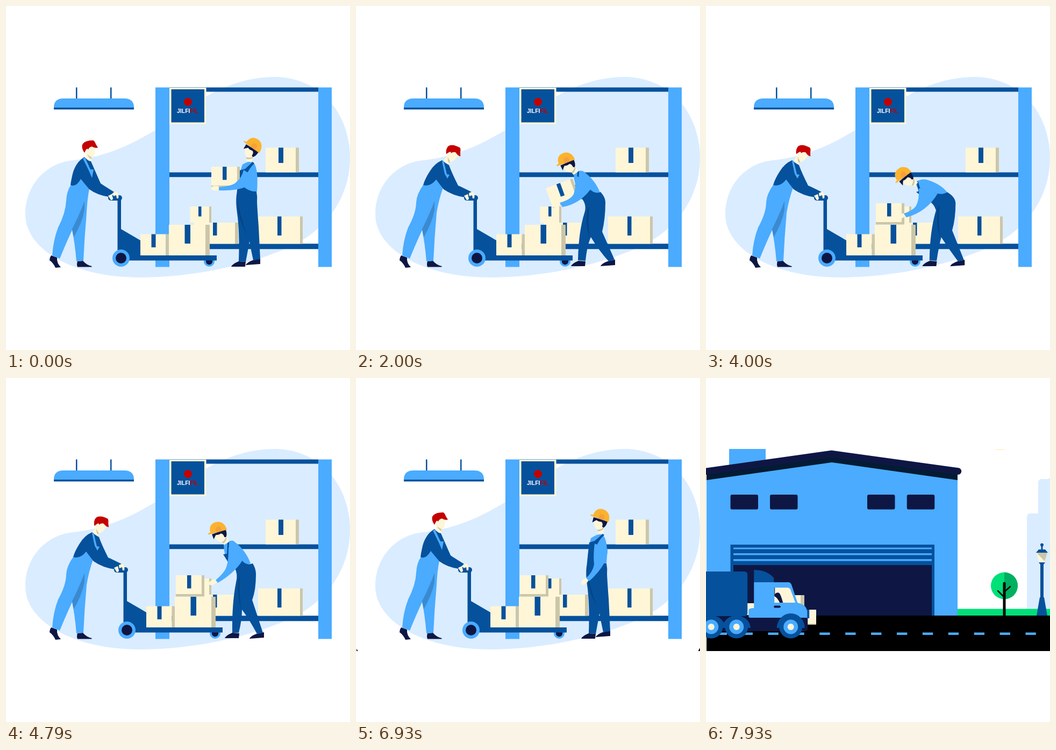
These frames come from a looping animation (640 px wide and 640 px high, 8000 ms). An HTML page:

```html
<!DOCTYPE html>
<html lang="en">
<head>
<meta charset="utf-8">
<title>Warehouse</title>
<style>
  html, body { margin: 0; width: 100%; height: 100%; overflow: hidden; background: #fff; }
  svg { display: block; width: 100vw; height: 100vh; }
  .light { fill: #4aabff; }
  .dark { fill: #06519c; }
  .navy { fill: #0e1744; }
  .cream { fill: #fff6d8; }
  .shade { fill: #ccc6a9; }
  .pale { fill: #daecff; }
  .red { fill: #c40000; }
  .fold { fill: #04437f; }
  .green { fill: #00e078; }
  text { font: bold 10.5px "Liberation Sans", Arial, sans-serif; }
</style>
</head>
<body>
<svg viewBox="0 0 640 640">
  <defs>
    <clipPath id="stage"><rect y="131.9" width="640" height="376.2"/></clipPath>
    <clipPath id="iris"><circle id="irisCircle" cx="320" cy="320" r="500"/></clipPath>
  </defs>

  <g id="street" clip-path="url(#stage)">
    <circle cx="547" cy="99.5" r="35" class="cream"/>
    <path class="pale" d="M597 442V259q0-7 7-7h14V195q0-7 7-7h12l3-3V442z"/>
    <path class="green" d="M468 429.500H640V443H468z"/>
    <path class="light" d="M43 130H111V180H43zM1 175L234 146 468 175V442H1z"/>
    <path fill="#031b33" d="M1 172L234 142 468 172V190L234 157 1 190z"/>
    <path d="M-5 174.500L233.500 141 469 173.500" fill="none" stroke="#0e1744" stroke-width="12.500" stroke-linecap="round" stroke-linejoin="round"/>
    <g class="navy" id="windows"></g>
    <path class="dark" d="M45.500 310H425V442H45.500z"/>
    <path class="light" d="M51 315.500H420v3H51zM51 326H420v3.500H51zM51 337H420v3.500H51z"/>
    <path class="navy" d="M51 348H420v94H51z"/>
    <path d="M1 442H640V508H1z"/>
    <path d="M19.700 475.800H640" stroke="#4aabff" stroke-width="4.500" stroke-dasharray="19.300 28.600"/>
    <path class="cream" d="M74 419H110V441H74zM128 404H176V431H128zM130 431H205V457H130z"/>
    <path class="shade" d="M176 404h7v27h-7zM130 457h75v2h-75z"/>
    <circle cx="555" cy="386.500" r="25" class="green"/>
    <path fill="#00b060" d="M555 361.500a25 25 0 0 1 0 50z"/>
    <path d="M555 382V442" stroke="#000" stroke-width="5" stroke-linecap="round"/>
    <path d="M543 396L555 408M566 388L555 398" stroke="#000" stroke-width="2.500" stroke-linecap="round"/>
    <path class="dark" d="M623.500 311h3v8h4.500l5 6H614l5-6h4.500zM619 343h12l-3 4v61h1l6 34H615l6-34h1V347z"/>
    <circle cx="625" cy="310.500" r="3" class="dark"/>
    <path class="cream" d="M615 325H635L630 343H620z"/>
    <path class="shade" d="M615 325H635L630 341z"/>
    <g id="truck">
      <path class="navy" d="M-220 442H189V466q0 5-5 5H-220z"/>
      <path class="dark" d="M-220 360H71q6 0 6 6V437q0 6-6 6H-220z"/>
      <path class="dark" d="M89 357Q113 357 126 372V381H89zM186 431h6v16h-6z"/>
      <path class="light" d="M89 380H153Q157 380 159 385L170 418Q188 422 188 436V446H82q-3 0-3-3V432q0-4 10-4z"/>
      <path class="cream" d="M127 390H151Q155 390 157 394L166 418H127z"/>
      <path class="navy" d="M127 390h1v12q3-4 8-2 3 3 7 18H137q-5-10-10-12z"/>
      <rect x="126" y="423.500" width="12.500" height="4" rx="2" class="navy"/>
      <g id="wheels"></g>
    </g>
  </g>

  <g id="warehouse" clip-path="url(#iris)">
    <path fill="#fff" d="M0 132H640V508H0z"/>
    <path class="pale" d="M36 388C36 330 78 291 125 287C190 280 235 256 278 231C330 198 400 132 500 132C580 132 640 195 640 283C640 340 612 395 560 430C500 470 370 505 250 505C120 505 36 450 36 388z"/>
    <path class="dark" d="M130 151.500h2.500V173H130zM194 151.500h2.500V173H194zM89 188h149v4.500H89z"/>
    <path class="light" d="M89 189Q89 172 107 172H220Q238 172 238 189z"/>
    <path class="dark" d="M304 151.500H581v8H304zM304 309.500H581v8.700H304zM304 442.300H581v10H304z"/>
    <path class="light" d="M278 151.500h26V485.500H278zM581 151.500h25V485.500H581z"/>
    <path class="cream" d="M304 152h68.500v68H304z"/>
    <path class="dark" d="M307.500 155H369V216.500H307.500z"/>
    <circle cx="338.500" cy="178.500" r="7.500" class="red"/>
    <text x="318" y="198.500" fill="#fff">JILFI<tspan class="red">FIL</tspan></text>
    <g id="shelfBoxes"></g>

    <g id="cart">
      <circle cx="378" cy="475" r="10" class="light"/>
      <circle cx="378" cy="475" r="6.200" class="navy"/>
      <path class="dark" d="M207.500 356H214V415L250 436V464H392v9.500H207.500z"/>
      <rect x="190" y="352" width="26" height="10" rx="5" class="dark"/>
      <g id="cartBoxes"></g>
      <circle cx="214" cy="469" r="16" class="light"/>
      <circle cx="214" cy="469" r="10" class="navy"/>
    </g>

    <path class="navy" d="M84 464L95 468Q94 478 102 486L92 487Q88 478 81 473Q81 468 84 464zM133 475L143 474Q150 482 159.500 484V485.500H133Q131 481 133 475z"/>
    <path id="pusherPants" class="light"/>
    <path fill="#3b8ad0" d="M146 363Q138 385 123 415L126 430Q141 405 146 380z"/>
    <g id="pusherHead">
      <path class="cream" d="M-7 5L-4 2 4-2 10 2Q10 15 5 19L3 20 3 27-8 24-7 12z"/>
      <path class="shade" d="M-5 14Q0 18 3 19L2.500 23Q-2 20-5 14z"/>
      <path class="red" d="M-10 11Q-16 3-14-4-10-12 6-12 9-11 11-5L15 1.500Q9 3 4-.5-1 0-3 5-5 2-7 5z"/>
    </g>
    <path id="pusherJacket" class="dark"/>
    <path id="pusherStrap" class="light"/>
    <g id="pusherHands" class="cream">
      <path d="M190 353L197 350 199 358Q198 362 195 361zM199 348L205 345.500Q211 350 209 358L206 358 205 352 200 354z"/>
    </g>

    <path id="shoes" class="navy"/>
    <path id="torso" class="light"/>
    <path id="legs" class="dark"/>
    <path id="fold" class="fold"/>
    <path id="bib" class="dark"/>
    <g id="head">
      <path class="cream" d="M-5 4L9 5 14 9 16 24 6 27 4 21Q-4 19-7 11z"/>
      <path class="shade" d="M4 21Q10 19 13 13L14 16Q11 22 5 24z"/>
      <path class="navy" d="M-11 2L16 0Q17 9 13 14L10 13Q10 7 6 5-1 7-4 5-7 8-10 12z"/>
      <path fill="#fbb32f" d="M-13-2C-13-14-6-18 2-18C12-18 18-10 18 1L-18 1Q-18-2-13-2z"/>
      <path fill="#f79f3c" d="M-2 1V-7Q4-11 8-7V1z"/>
    </g>
    <g id="parcel"></g>
    <ellipse id="hand" rx="8.500" ry="4.500" class="cream"/>
    <path id="arm" class="light"/>
  </g>
</svg>

<script>
const LOOP = 8000;
const el = id => document.getElementById(id);
const clamp = x => Math.min(1, Math.max(0, x));
const span = (t, from, to) => clamp((t - from) / (to - from));
const sine = u => (1 - Math.cos(Math.PI * u)) / 2;
const outQuad = u => 1 - (1 - u) ** 2;
const outCubic = u => 1 - (1 - u) ** 3;
const inOutQuad = u => u < .5 ? 2 * u * u : 1 - 2 * (1 - u) ** 2;
const linear = u => u;

// Blends two path or transform strings of the same structure.
const NUMBER = /-?\d+(\.\d+)?/g;
function mix(a, b, u) {
  const ends = b.match(NUMBER);
  let i = 0;
  return a.replace(NUMBER, n => (+n + (ends[i++] - n) * u).toFixed(2));
}

function box(x, y, w, h, side, tapeX, tapeW, tapeH) {
  return `<path class="cream" d="M${x} ${y}h${w}v${h}h${-w}z"/>
    <path class="shade" d="M${x + w} ${y}h${side}v${h}h${-side}z"/>
    <path class="dark" d="M${tapeX} ${y}h${tapeW}v${tapeH}h${-tapeW}z"/>`;
}

el('shelfBoxes').innerHTML =
  box(483, 263.5, 56, 46, 6, 507, 9, 28.5) +
  box(469, 391.5, 78, 51, 5, 505, 7.5, 35.5) +
  box(350, 403, 76, 39.5, 6, 385, 7.5, 24) +
  box(342.5, 373, 35.5, 30, 4, 358, 5.5, 18.5);
el('cartBoxes').innerHTML =
  box(250, 424.5, 47.5, 39.5, 6, 270.5, 8, 24.5) +
  box(303, 407, 68, 57, 8, 332.5, 10.5, 35);
el('parcel').innerHTML =
  '<path class="shade" d="M0 34h53v5.500H0z"/>' + box(0, 0, 48, 35, 5, 21, 7.5, 24.5);
el('windows').innerHTML = [45.5, 119, 300, 373.8]
  .map(x => `<rect x="${x}" y="217" width="51.500" height="27.500" rx="3"/>`).join('');
el('wheels').innerHTML = [9.5, 56.5, 157.5].map(x =>
  `<path class="dark" d="M${x - 26} 465a26 ${x > 100 ? 27 : 23} 0 0 1 52 0z"/>` +
  [[21.5, 'dark'], [13.5, 'light'], [6, 'cream']]
    .map(([r, c]) => `<circle cx="${x}" cy="463" r="${r}" class="${c}"/>`).join('')).join('');

const place = (x, y, angle) => `translate(${x} ${y}) rotate(${angle})`;
const shoes = (x1, y1, x2, y2) =>
  `M${x1} ${y1}l13 1l-1 9h-26q2 -5 14 -10zM${x2} ${y2}l14 -3v10l-27 2q2 -5 13 -9z`;

const stand = {
  shoes: shoes(433, 475, 459, 473),
  fold: 'M431 362Q436 395 447 422Q438 408 433 385Z',
  legs: 'M429 350L444 338Q455 346 466 345Q468 355 467 365Q468 385 470 410L473 471L460 473Q456 455 453 438Q450 455 446 476L433 475Q435 420 430 385Q427 365 429 350Z'
};
const step = {
  shoes: shoes(421, 474, 466, 476),
  fold: 'M435 366Q433 390 437 430Q430 405 432 376Z',
  legs: 'M425 352L438 338Q446 350 459 345Q465 355 465 365Q465 395 458 413L478 474L467 476Q452 448 439 431Q439 450 433 474L421 474Q420 420 428 380Q432 365 425 352Z'
};
const wideFold = 'M434 373Q431 395 434 430Q427 410 430 380Z';
const wideShoes = shoes(414, 474, 468, 475);
const wideTail = 'Q464 395 458 420L481 472L470 475Q452 455 437 430Q430 445 427 474L413 473Q414 420 ';
const bentLegs = `M408 367L417 352Q436 354 443 347Q463 355 464 368${wideTail}428 380Q420 370 408 367Z`;

const poses = {
  holding: {
    ...stand,
    torso: 'M440 295Q452 287 460 291Q470 300 467 345L432 348Q432 315 440 295Z',
    bib: 'M434 306L445 303L459 290L462 293Q442 312 444 340L429 352Z',
    arm: 'M396 337Q420 335 427 329Q440 318 442 305L467 320Q452 345 396 343Z',
    head: place(457, 262, 36), hand: place(390, 339, 0), parcel: place(382, 299, 0)
  },
  turning: {
    ...step,
    torso: 'M417 302Q428 295 434 295Q452 308 459 346L426 354Q414 330 417 302Z',
    bib: 'M414 318L424 317L431 296L434 298Q424 318 427 345L425 354Z',
    arm: 'M391 361Q408 355 413 346Q421 332 420 308L452 325Q430 362 396 370Z',
    head: place(415, 272, 0), hand: place(386, 366, -12), parcel: place(363, 335, -22)
  },
  leaning: {
    shoes: wideShoes, fold: wideFold,
    legs: `M420 358L434 340Q445 351 455 346Q464 356 464 365${wideTail}425 385Q430 370 420 358Z`,
    torso: 'M405 310Q416 305 422 307Q444 322 454 347L420 360Q405 335 405 310Z',
    bib: 'M404 335L410 332L412 308L415 308Q413 330 418 350L420 360Z',
    arm: 'M379 366Q400 360 405 350Q410 335 408 315L442 333Q420 368 384 374Z',
    head: place(390, 291, -20), hand: place(372, 370, -10), parcel: place(353, 339, -20)
  },
  bending: {
    shoes: wideShoes, fold: wideFold, legs: bentLegs,
    torso: 'M389 332Q398 326 410 328Q432 332 445 347L425 372Q395 355 389 332Z',
    bib: 'M392 350L395 348L388 333L391 331Q398 345 402 355L408 367Z',
    arm: 'M367 386Q388 378 391 372Q397 360 395 345L430 352Q408 388 373 392Z',
    head: place(361, 329, -44), hand: place(362, 389, -25), parcel: place(339, 360, -24)
  },
  placing: {
    shoes: wideShoes, fold: wideFold, legs: bentLegs,
    torso: 'M381 338Q390 332 403 334Q430 336 445 347L425 372Q392 362 381 338Z',
    bib: 'M384 356L387 354L380 339L383 337Q391 350 398 358L408 367Z',
    arm: 'M356 392Q376 388 381 381Q388 370 386 352L424 358Q400 396 361 400Z',
    head: place(353, 336, -48), hand: place(350, 397, -20), parcel: place(316, 367, 0)
  },
  rising: {
    ...step,
    torso: 'M405 310Q416 301 423 303Q446 320 455 345L422 356Q405 335 405 310Z',
    bib: 'M404 328L411 327L412 305L415 305Q413 330 416 345L422 357Z',
    arm: 'M390 376Q404 364 408 356Q414 345 414 315L444 332Q430 360 394 381Z',
    head: place(393, 286, -15), hand: place(385, 380, -25), parcel: place(316, 367, 0)
  },
  resting: {
    ...stand,
    torso: 'M437 298Q450 289 458 291Q470 300 466 345L430 348Q431 318 437 298Z',
    bib: 'M434 306L444 303L459 290L462 292Q442 310 443 340L429 352Z',
    arm: 'M428 372Q440 362 443 347Q441 330 444 308L468 318Q470 345 434 378Z',
    head: place(453, 261, 20), hand: place(426, 378, -42), parcel: place(316, 367, 0)
  }
};

const PLACED = 3570;
const keys = [
  [0, 'holding', linear], [570, 'turning', linear], [2000, 'leaning', linear],
  [3000, 'bending', linear], [PLACED, 'placing', linear], [4790, 'rising', outCubic],
  [5700, 'resting', linear], [LOOP, 'resting', linear]
];

const pusher = {
  pusherPants: [
    'M120 334Q113 345 112 362Q111 385 97 412Q88 435 86 464L100 470Q110 445 123 417Q128 440 131 475L144 474Q146 430 150 385Q151 360 155 340L137 320Z',
    'M125 333Q113 350 112 365Q112 385 97 412Q88 435 86 464L100 470Q110 445 123 417Q128 440 131 475L144 474Q146 430 150 385Q154 360 162 338L146 320Z'],
  pusherJacket: [
    'M146 281Q130 290 124 312Q121 325 120 333Q130 338 139 322L155 341Q170 352 191 355L201 346Q180 333 176 330Q165 305 158 289Q152 288 146 281Z',
    'M160 287Q146 293 137 308Q128 322 125 333Q138 337 149 323L163 341Q180 353 203 356L217 347Q195 336 190 334Q178 310 173 296Q167 293 160 287Z'],
  pusherStrap: [
    'M143 284L147 282L157 304L163 304L160 320L154 306Z',
    'M160 289L163 288L169 313L174 314L170 321L165 312Z'],
  pusherHead: [place(156, 262, 0), place(182, 271, 30)]
};

function pose(id, value) {
  el(id).setAttribute(/^[tr]/.test(value) ? 'transform' : 'd', value);
}

function drawPusher(t) {
  const push = t < 3000 ? outQuad(span(t, 0, 1450)) : 1 - sine(span(t, 5050, 6570));
  const nod = t < 3000 ? outQuad(span(t, 0, 1500)) : 1 - sine(span(t, 4200, 6570));
  for (const id in pusher) {
    pose(id, mix(...pusher[id], id === 'pusherHead' ? nod : push));
  }
  const shift = 11 * push;
  pose('cart', `translate(${shift} 0)`);
  pose('pusherHands', `translate(${shift} 0)`);
  return shift;
}

function drawLoader(t, shift) {
  const i = keys.findIndex(([end], n) => t < end && n > 0) - 1;
  const [start, from, ease] = keys[i];
  const [end, to] = keys[i + 1];
  const u = ease(span(t, start, end));
  for (const id in poses[from]) pose(id, mix(poses[from][id], poses[to][id], u));
  if (t >= PLACED) pose('parcel', place(305 + shift, 367, 0));
}

function draw(t) {
  drawLoader(t, drawPusher(t));
  const closing = t >= 6880;
  const iris = inOutQuad(span(t, 6880, 7700));
  el('street').style.display = closing ? '' : 'none';
  el('warehouse').style.display = iris < 1 ? '' : 'none';
  el('irisCircle').setAttribute('r', closing ? 371 * (1 - iris) : 500);
  pose('truck', `translate(${(t - 7930) * .23} 0)`);
}

function frame() {
  draw(performance.now() % LOOP);
  requestAnimationFrame(frame);
}
frame();
</script>
</body>
</html>
```
